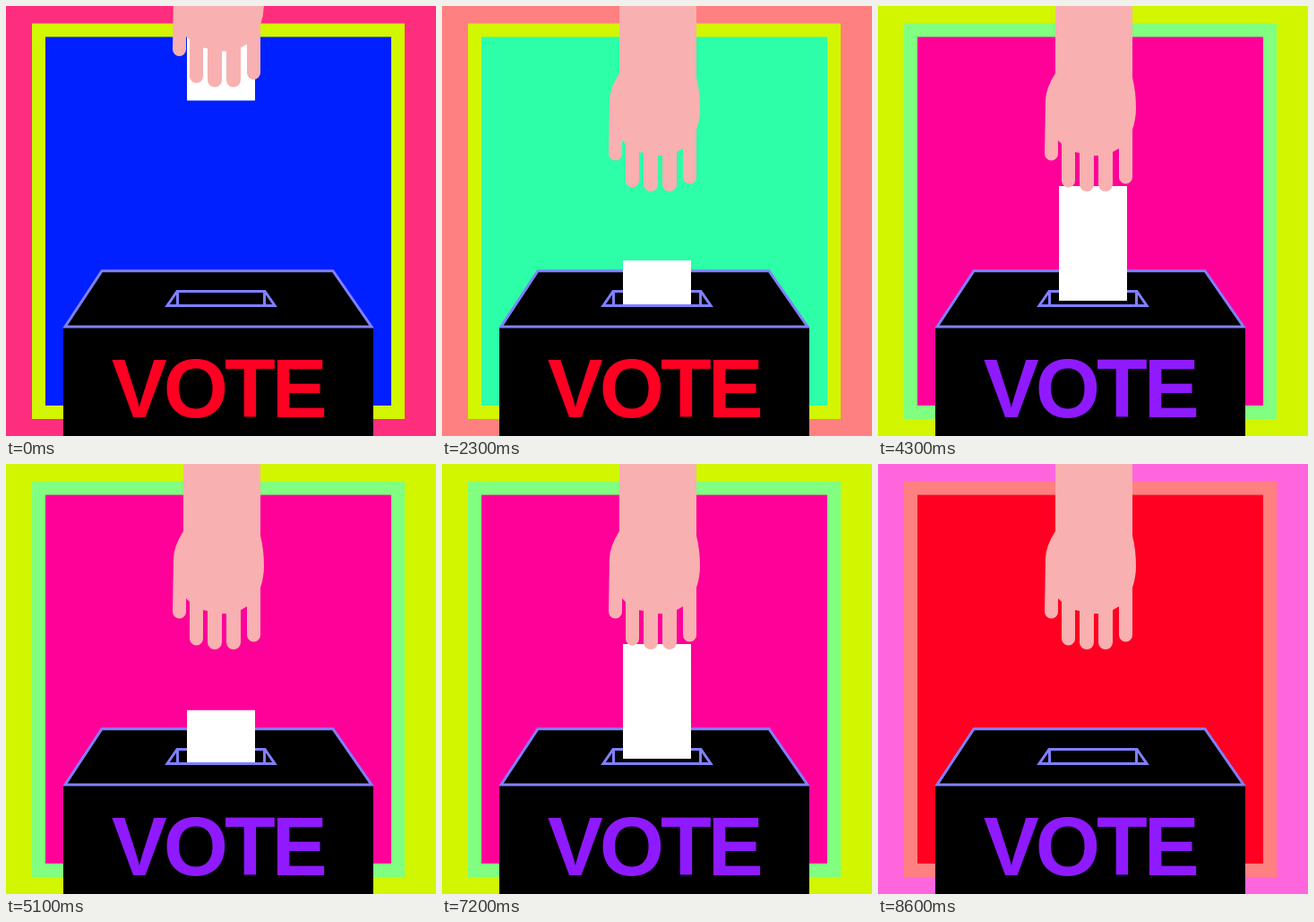
These frames come from a looping animation (480 px wide and 480 px high, 8700 ms). An HTML page:

```html
<!DOCTYPE html>
<html lang="en">
<head>
<meta charset="utf-8">
<title>Vote</title>
<style>
  html, body { margin: 0; width: 100%; height: 100%; overflow: hidden; }
  svg { display: block; width: 100vw; height: 100vh; }
  text { font: bold 93px "Liberation Sans", Arial, sans-serif; letter-spacing: -4.1px; }
  .line { fill: #000; stroke: #8080ff; stroke-width: 3; }
</style>
</head>
<body>
<svg viewBox="0 0 480 480">
  <defs>
    <clipPath id="aboveSlot"><rect y="-200" width="480" height="533"/></clipPath>
  </defs>
  <rect id="wall" width="480" height="480"/>
  <rect id="border" x="29" y="19.5" width="416" height="441.5"/>
  <rect id="panel" x="44" y="34.5" width="386" height="411.5"/>

  <rect x="64" y="358.5" width="346" height="122"/>
  <path class="line" d="M107 295.7H365L408 358H66Z"/>
  <path class="line" d="M191 318.5H289L300 334.5H180Z M191.5 318V334 M288.5 318V334"/>
  <text id="label" x="117.8" y="459">VOTE</text>

  <g clip-path="url(#aboveSlot)">
    <rect id="card" x="202" width="76" height="128" fill="#fff"/>
  </g>
  <path id="hand" fill="#f8b0b0" d="M198 -10H284V80Q288 96 288 114Q288 126 284 138
    V191a7.5 7.5 0 0 1-15 0V159L262 163V199a8 8 0 0 1-16 0V167H241V199a8 8 0 0 1-16 0
    V164L220 163V195a7.5 7.5 0 0 1-15 0V154L201 150V165a7.5 7.5 0 0 1-15 0
    L187 106Q187 92 198 75Z"/>
</svg>
<script>
const STEP = 100, STEPS = 29;
const REACH = 4.4;      // steps until the hand is fully down
const HAND_START = -116.5;

const palette = {
  pink: '#ff2d7d', blue: '#0020ff', mint: '#2dffa8', salmon: '#ff8080', lime: '#d2f500',
  orchid: '#ff66dd', green: '#80ff80', magenta: '#ff0099', red: '#ff0022', violet: '#8f1aff'
};

// Colour schemes, one per step, in rotation
const parts = ['wall', 'border', 'panel', 'label'];
const schemes = [
  'pink lime blue red',
  'mint red violet violet',
  'blue salmon green violet',
  'green lime pink red',
  'orchid salmon red violet',
  'magenta mint blue red',
  'lime green magenta violet',
  'salmon lime mint red'
].map(scheme => scheme.split(' '));

// Card height once released: [step, y]
const fall = [[REACH, 94], [10, 160], [14, 201], [23, 284], [28, 335]];

const $ = id => document.getElementById(id);

function handY(step) {
  const progress = Math.min(step / REACH, 1);
  return HAND_START * (1 + Math.cos(Math.PI * progress)) / 2;
}

function cardY(step) {
  if (step <= REACH) return handY(step) + fall[0][1];
  const next = fall.findIndex(([s]) => s >= step);
  const [s0, y0] = fall[next - 1], [s1, y1] = fall[next];
  return y0 + (y1 - y0) * (step - s0) / (s1 - s0);
}

function draw(step) {
  const scheme = schemes[step % schemes.length];
  parts.forEach((id, i) => $(id).setAttribute('fill', palette[scheme[i]]));
  $('hand').setAttribute('transform', `translate(0 ${handY(step)})`);
  $('card').setAttribute('y', cardY(step));
}

const start = performance.now();
function tick() {
  draw(Math.floor((performance.now() - start) / STEP) % STEPS);
  requestAnimationFrame(tick);
}
tick();
</script>
</body>
</html>
```
